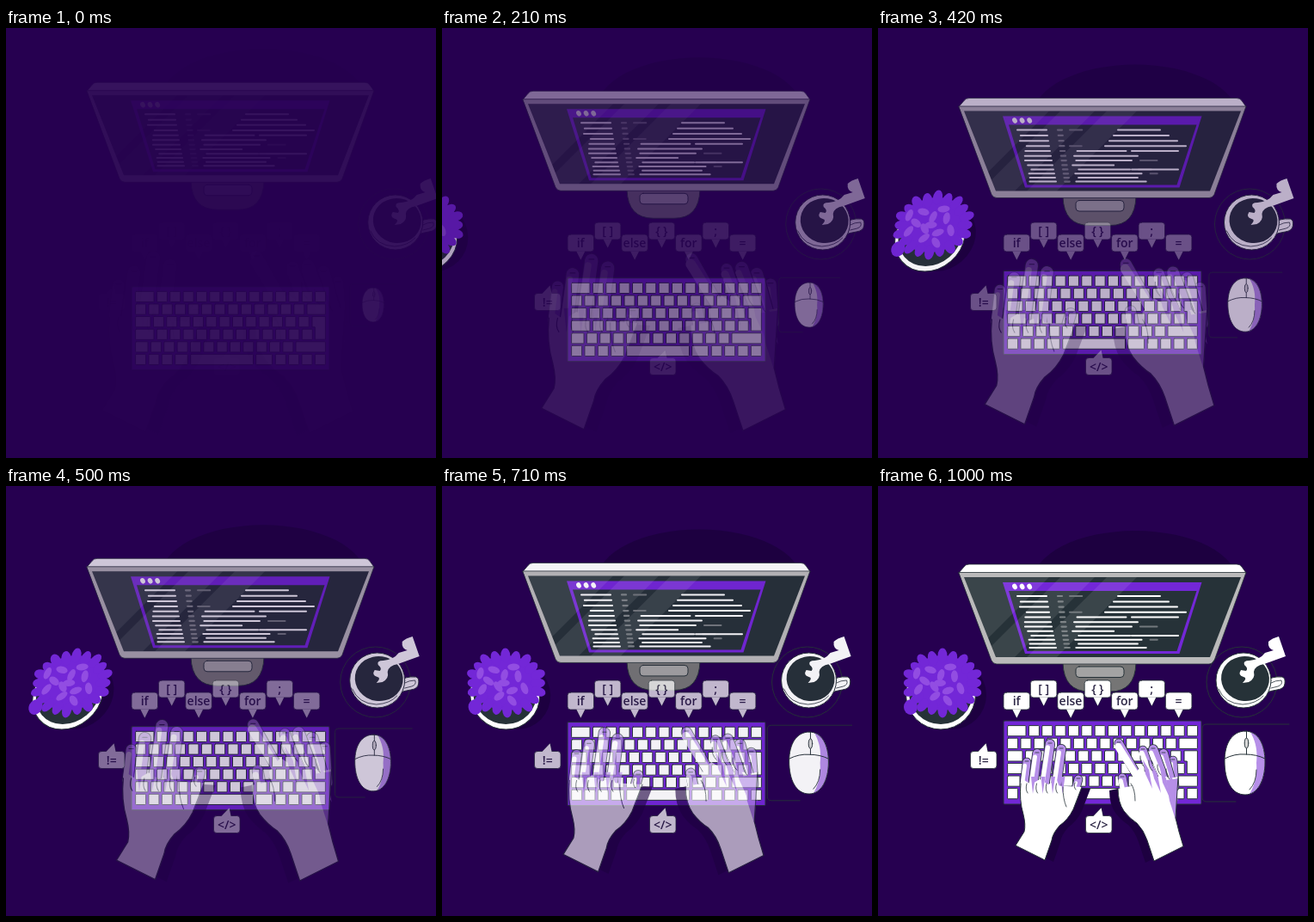
Animation, 500 px wide and 500 px high, one loop 1040 ms. Source, as an HTML page with a canvas:

```html
<!DOCTYPE html>
<html lang="en">
<head>
<meta charset="utf-8">
<title>Coding desk</title>
<style>
html, body { margin: 0; width: 100%; height: 100%; overflow: hidden; background: #260050; }
canvas { display: block; width: 500px; height: 500px; }
</style>
</head>
<body>
<canvas id="stage" width="500" height="500"></canvas>
<script>
const LOOP = 1040, FRAME = 1000 / 24, LAST = 24;
const BG = '#260050', SHADE = '#1d0040', INK = '#263238';
const PURPLE = '#7327d7', LILAC = '#b68fe8', WHITE = '#ffffff';

const stage = document.getElementById('stage').getContext('2d');
const buffer = document.createElement('canvas');
buffer.width = buffer.height = 500;
const c = buffer.getContext('2d');

// cubic-bezier(0, 0, .58, 1)
function easeOut(x) {
  if (x <= 0) return 0;
  if (x >= 1) return 1;
  let lo = 0, hi = 1;
  for (let n = 0; n < 24; n++) {
    const s = (lo + hi) / 2;
    if (3 * (1 - s) * s * s * 0.58 + s * s * s < x) lo = s; else hi = s;
  }
  return 3 * (1 - lo) * lo * lo + lo * lo * lo;
}
const easeIn = x => 1 - easeOut(1 - x);

function randomizer(seed) {
  return () => (seed = (seed * 16807) % 2147483647) / 2147483647;
}

function paint(path, fill, stroke, width = 1) {
  if (fill) { c.fillStyle = fill; c.fill(path); }
  if (stroke) { c.strokeStyle = stroke; c.lineWidth = width; c.stroke(path); }
}
function shape(d, fill, stroke, width) {
  paint(new Path2D(d), fill, stroke, width);
}
function oval(x, y, rx, ry, fill, stroke, turn = 0) {
  const p = new Path2D();
  p.ellipse(x, y, rx, ry, turn, 0, Math.PI * 2);
  paint(p, fill, stroke);
}
function box(x, y, w, h, r, fill, stroke, width) {
  const p = new Path2D();
  p.roundRect(x, y, w, h, r);
  paint(p, fill, stroke, width);
}
function stick(x1, y1, x2, y2, width, color) {
  c.strokeStyle = color;
  c.lineWidth = width;
  c.beginPath();
  c.moveTo(x1, y1);
  c.lineTo(x2, y2);
  c.stroke();
}

// Each group is drawn opaque, then blended as one.
function layer(alpha, place, draw) {
  if (alpha <= 0) return;
  c.setTransform(1, 0, 0, 1, 0, 0);
  c.clearRect(0, 0, 500, 500);
  c.lineCap = c.lineJoin = 'round';
  place();
  draw();
  stage.globalAlpha = alpha;
  stage.drawImage(buffer, 0, 0);
}
function zoom(x, y, k) {
  c.translate(x, y);
  c.scale(k, k);
  c.translate(-x, -y);
}

function code() {
  const random = randomizer(11);
  for (let n = 0; n < 12; n++) {
    const y = 128 + 6.5 * n - .095 * n * n;
    stick(162 + 1.3 * n + 8 * random(), y, 196 + n, y, 2, WHITE);
    stick(209 + .75 * n, y, 214 + .8 * n, y, 2.2, '#7f8588');
    // Upper lines hang to the right, lower ones start at the left.
    const high = n < 4;
    const from = high ? 279 - 5 * n : 225 + 14 * random();
    const to = high ? 328 + 10 * n : 262 + 56 * random();
    stick(from, y, to, y, 2, WHITE);
    if (n % 3 == 0 || n == 8) {
      const x = high ? 223 : to + 10;
      stick(x, y, x + 8 + 14 * random(), y, 2, '#73797d');
    }
    if (n % 4 == 0 && !high) stick(295, y, 349, y, 2, WHITE);
  }
}

function monitor() {
  oval(299, 112, 119, 60, SHADE);
  shape('M215 206Q216 239 246 239H270Q299 239 300 206Z', '#757575', INK);
  box(230, 210, 56, 12.5, 4, '#a3a3a3', INK);
  shape('M94 101L100 94Q102 91 106 91H417Q421 91 423 94L428 101Z', WHITE, INK, .8);
  shape('M94 100.5H428L391 203Q389 207 385 207H138Q134 207 132 203Z', '#bababa', INK, .8);
  const screen = new Path2D('M100 106H422L386 199H137Z');
  paint(screen, INK);
  shape('M145 112H376.5L350.5 195H171Z', PURPLE);
  shape('M152 122H370.5L347.5 192H173.5Z', INK);
  for (let n = 0; n < 3; n++) oval(159 + n * 8.6, 117, 2.7, 3.4, WHITE, null, -.5);
  c.save();
  c.clip(screen);
  c.fillStyle = 'rgba(255,255,255,.09)';
  for (const [a, b] of [[190, 305], [318, 358], [372, 407]]) {
    c.beginPath();
    c.moveTo(a - 104, 104);
    c.lineTo(b - 104, 104);
    c.lineTo(b - 202, 202);
    c.lineTo(a - 202, 202);
    c.fill();
  }
  c.restore();
  code();
}

function plant() {
  oval(86, 243, 40, 40, SHADE);
  oval(73, 242.5, 40.5, 40.5, WHITE, INK);
  oval(73, 240, 37, 37, INK);
  oval(75, 229, 40, 32, PURPLE);
  for (let n = 0; n < 20; n++) {
    const a = n * Math.PI / 10, k = n % 2 ? 1 : .94;
    oval(75 + 39 * k * Math.cos(a), 229 + 32 * k * Math.sin(a), 8.5, 5.5, PURPLE, null, a);
  }
  oval(38, 257, 8, 9, PURPLE);
  for (let n = 0; n < 13; n++) {
    const a = n * 2.4, r = 9 * Math.sqrt(n);
    oval(72 + r * Math.cos(a), 229 + r * .72 * Math.sin(a), 7, 4, '#924de2', null, a * 1.7);
  }
}

function cup() {
  oval(423, 228, 41, 41, null, INK);
  shape('M452 227Q457 221 470 222Q474 223 473 230Q472 236 464 237Q456 238 450 241', WHITE, INK);
  shape('M457 229Q462 226 469 226Q471 231 465 233L457 235', null, INK, .8);
  oval(425, 226, 32, 32, WHITE, INK);
  oval(427, 224, 28, 26, INK, null, .15);
  shape('M396 236Q403 253 424 254Q440 253 448 244', null, INK, .8);
  shape('M454 181Q458 177 466 175L474 198L449 207Q438 209 437 216Q439 224 431 228L424 229' +
    'Q430 223 425 222Q418 220 422 214L428 215Q431 212 426 208Q424 203 432 203Q444 202 450 194L460 191Q453 189 454 181Z', WHITE);
}

function mouse() {
  shape('M478 277H382Q377 277 377 282V362Q377 367 382 367H416', null, INK);
  const body = new Path2D('M427 285C442 285 450 300 450 321C450 343 441 359 427 359C411 359 403 342 403 320C403 299 412 285 427 285Z');
  paint(body, WHITE);
  c.save();
  c.clip(body);
  shape('M432 284C441 300 441 310 440 322C441 340 437 350 431 360H455V284Z', LILAC);
  c.restore();
  paint(body, null, INK);
  shape('M403 317Q415 311 427 312Q440 312 450 317M428.5 285V312', null, INK);
  oval(428.5, 299, 2.3, 6, '#d8d8d8', INK);
  shape('M440 330Q440 345 432 353', null, INK, .9);
}

function keyboard() {
  box(146, 273, 230, 97, 1, PURPLE, INK);
  const pitch = 15.35, left = 150.6, right = 371.4;
  const key = (row, x, end) => box(x, 278.6 + row * 14.6, end - x, 12.2, .8, WHITE, INK);
  const run = (row, x, count) => {
    for (let n = 0; n < count; n++) key(row, x + n * pitch, x + n * pitch + 12);
    return x + count * pitch;
  };
  // Wide keys of growing width stagger the upper rows.
  [172, 0, 168, 172, 165].forEach((end, row) => {
    if (end) key(row, left, end);
    const next = run(row, end ? end + 3.4 : left, 11);
    if (row < 4) run(row, next, row == 3 ? 1 : row == 2 ? 1 : 2);
    if (row == 1 || row == 4) key(row, row == 1 ? 350 : 337, right);
  });
  shape('M356.3 307.8H371.4V334.4H359.3V320H356.3Z', WHITE, INK);
  run(5, left, 3);
  key(5, 196.7, 211.3);
  key(5, 214.7, 287.5);
  key(5, 290.7, 309.5);
  run(5, 313.3, 4);
}

function finger(x1, y1, x2, y2, w, lit = .5) {
  stick(x1, y1, x2, y2, w + 1.6, INK);
  stick(x1, y1, x2, y2, w, LILAC);
  const dx = w * (1 - lit) / 2;
  stick(x1 - dx, y1 + 4, x2 - dx, y2, w * lit, WHITE);
  stick(x1 - 2, y1 - 1, x1 + 2, y1 - 1, .8, INK);
}
// Outline left open at the knuckles, over a displaced shadow.
function palm(edge, shift) {
  const path = new Path2D(edge);
  c.save();
  c.translate(shift, 2);
  paint(path, SHADE);
  c.restore();
  return path;
}

function hands() {
  const l = palm('M166 346Q164 365 169 382Q172 394 170 402L160 418L194 435L202 412Q203 404 211 395Q221 388 227 376L237 350', 10);
  const r = palm('M279 352Q279 368 286 378Q293 387 301 392Q309 400 313 412L321 436L355 419L350 402L346 386L349 338', -10);

  finger(173, 321, 170, 348, 9);
  finger(185, 311, 180, 350, 10);
  finger(200, 300, 193, 350, 10.5);
  finger(213, 306, 207, 350, 10.5);
  finger(233, 341, 226, 366, 9, .4);
  paint(l, WHITE);
  shape('M166 348L170 342L178 347L188 341L198 347L208 342L215 360L223 356L237 350L225 375H172Z', WHITE);
  paint(l, null, INK);
  for (let n = 0; n < 4; n++) {
    const x = 175 + n * 11.5;
    shape(`M${x + 3} 338L${x + 8} 338L${x + 5} 358Z`, LILAC);
    shape(`M${x - 2} 346Q${x - 4} 353 ${x - 1} 357`, null, INK, .8);
  }
  shape('M215 350Q215 364 219 373M229 345Q227 350 230 353', null, INK, .8);

  finger(343, 319, 345, 350, 9);
  finger(332, 311, 341, 344, 10);
  finger(320, 306, 334, 344, 10);
  finger(308, 307, 319, 338, 9, .7);
  finger(280, 299, 302, 338, 9.5, .85);
  finger(284, 339, 290, 369, 9, .6);
  paint(r, WHITE);
  shape('M294 340L304 328L319 338L336 338L349 344L344 370L283 366L293 349L299 362Z', WHITE);
  for (let n = 0; n < 4; n++) {
    const x = 308 + n * 10, y = 318 + n * 5;
    shape(`M${x} ${y}L${x + 7} ${y + 12}L${x + 11} ${y + 34}L${x + 3} ${y + 17}Z`, LILAC);
    shape(`M${x - 3} ${y - 4}Q${x - 4} ${y + 3} ${x + 1} ${y + 8}`, null, INK, .8);
  }
  shape('M349 340L346 388L339 366L335 342Z', LILAC);
  paint(r, null, INK);
  shape('M294 346Q299 352 299 366', null, INK, .8);
}

function bubble(label, x, y, up) {
  const tx = x + (up ? 18 : 15.3), base = up ? y + .5 : y + 19.5, tip = up ? y - 9 : y + 29.5;
  const tail = `M${tx - (up ? 9 : 5)} ${base}L${tx} ${tip}L${tx + (up ? 2 : 5)} ${base}`;
  shape(tail, WHITE, INK, .8);
  box(x, y, 30.5, 20, 3.5, WHITE, INK, .8);
  shape(tail, WHITE);
  c.fillStyle = '#2c2645';
  c.fillText(label, x + 15.2, y + 15);
}
function bubbles() {
  c.font = '600 14px "Open Sans", "Noto Sans", sans-serif';
  c.textAlign = 'center';
  ['if', '[ ]', 'else', '{ }', 'for', ';', '='].forEach((label, n) => {
    bubble(label, 146 + 31.4 * n, n % 2 ? 226 : 240);
  });
  bubble('!=', 107.5, 308.5, true);
  bubble('</>', 241.5, 383.5, true);
}

// Sweep in from the left with a skew that swings and settles.
function sweep(t) {
  const a = easeOut(t / .6), b = easeOut((t - .6) / .2), d = easeOut((t - .8) / .2);
  const skew = 20 - 30 * a + 12 * b - 2 * d;
  return { x: -262 * (1 - a), skew: Math.tan(skew * Math.PI / 180), alpha: a };
}

function render(i) {
  const t = (i + 1) / 22;
  const p = easeOut(t), rest = 30 * (1 - p);
  const h = easeIn((i + .8) / 24);
  const s = sweep(t);

  stage.globalAlpha = 1;
  stage.fillStyle = BG;
  stage.fillRect(0, 0, 500, 500);

  layer(p, () => c.translate(0, -rest), monitor);
  layer(s.alpha, () => {
    c.translate(75 + s.x, 237);
    c.transform(1, 0, s.skew, 1, 0, 0);
    c.translate(-75, -237);
  }, plant);
  layer(p, () => c.translate(rest, 0), cup);
  layer(p, () => zoom(427, 322, .5 + .5 * p), mouse);
  layer(p, () => c.translate(0, rest), keyboard);
  layer(h, () => zoom(257.5, 365, 1.5 - .5 * h), hands);
  layer(easeIn(t), () => {}, bubbles);
}

const start = performance.now();
function tick() {
  const t = (performance.now() - start) % LOOP;
  render(Math.min(LAST, Math.floor(t / FRAME + .1)));
  requestAnimationFrame(tick);
}
tick();
</script>
</body>
</html>
```
